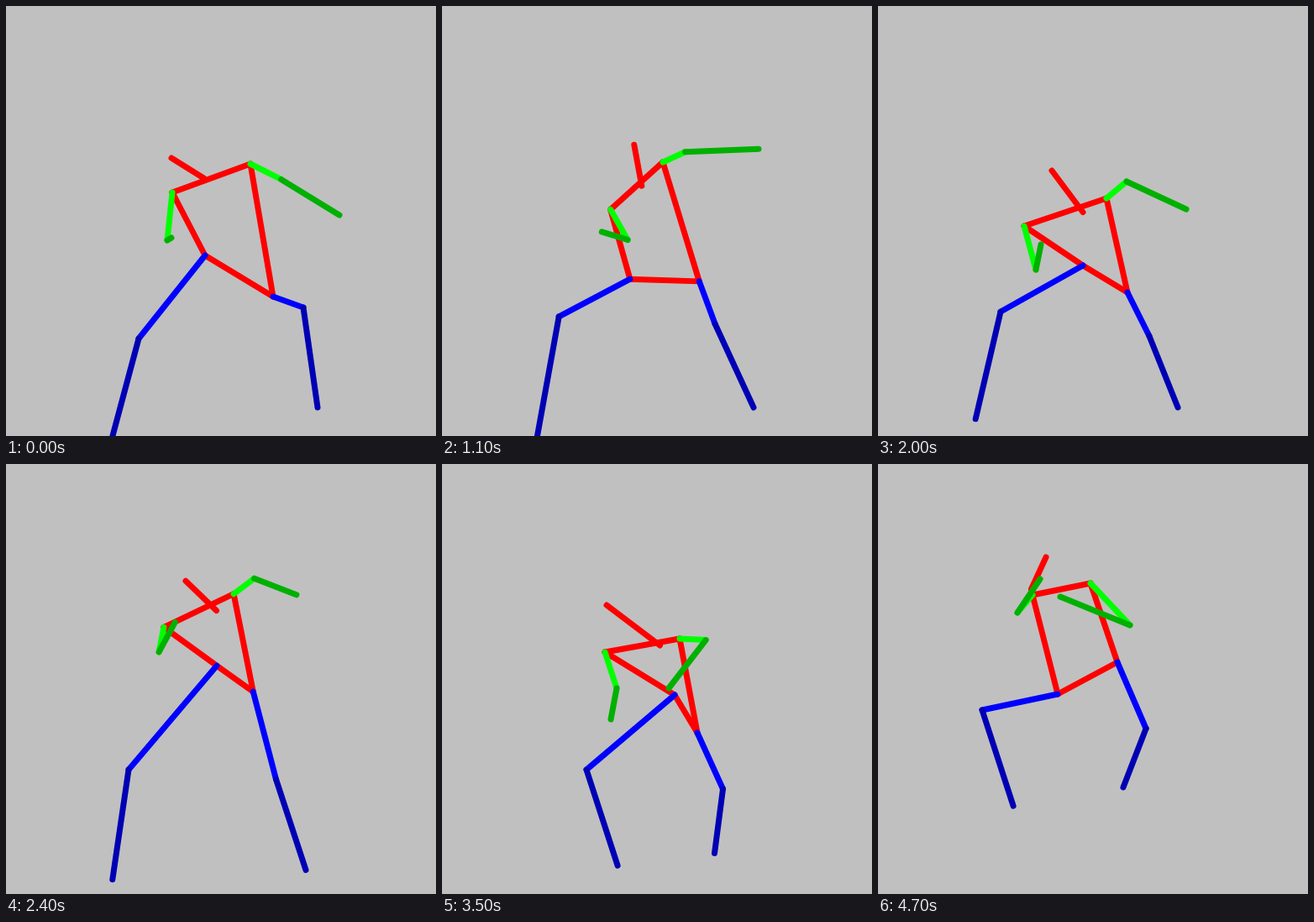
Animation, 512 px wide and 512 px high, one loop 4800 ms. Source, as an HTML page with a canvas:

```html
<!DOCTYPE html>
<html lang="en">
<head>
<meta charset="utf-8">
<title>Stick figure</title>
<style>
html, body { margin: 0; width: 100%; height: 100%; overflow: hidden; background: #c0c0c0; }
canvas { display: block; width: 100vw; height: 100vh; }
</style>
</head>
<body>
<canvas id="stage" width="512" height="512"></canvas>
<script>
const ctx = document.getElementById('stage').getContext('2d');
const LOOP = 4.8, FPS = 10;
const times = [0, 0.7, 1.4, 2, 2.9, 3.5, 4.7];

// Key points of the upper body, one x, y pair per key time
const keys = {
  head: [197,181, 206,192, 240,151, 207,196, 225,168, 196,168, 200,111],
  shoulderL: [198,222, 204,269, 195,224, 174,262, 208,212, 194,224, 184,156],
  shoulderR: [291,188, 269,186, 262,191, 272,229, 270,168, 283,208, 253,142],
  hipL: [237,297, 227,338, 225,312, 244,309, 259,264, 277,275, 214,274],
  hipR: [318,346, 315,322, 300,335, 297,341, 293,294, 304,320, 285,236],
  elbowL: [192,279, 207,261, 225,295, 188,314, 185,221, 208,267, 166,177],
  handL: [197,276, 192,303, 190,247, 194,284, 209,186, 201,304, 193,137],
  handR: [397,249, 365,205, 386,160, 367,242, 315,156, 270,267, 217,158]
};

const RED = '#ff0000', GREEN = '#00ff00', DARK_GREEN = '#00b000';
const BLUE = '#0000ff', DARK_BLUE = '#0000b4';

function slope(track, axis, i) {
  const a = Math.max(i - 1, 0), b = Math.min(i + 1, times.length - 1);
  return (track[2 * b + axis] - track[2 * a + axis]) / (times[b] - times[a]);
}

// Cubic Hermite curve through the keys
function sample(track, axis, t) {
  let i = times.length - 2;
  while (i > 0 && t < times[i]) i--;
  const span = times[i + 1] - times[i];
  const u = (t - times[i]) / span, v = 1 - u;
  return track[2 * i + axis] * v * v * (1 + 2 * u)
    + track[2 * i + 2 + axis] * u * u * (3 - 2 * u)
    + span * u * v * (v * slope(track, axis, i) - u * slope(track, axis, i + 1));
}

// Rises from 0 to 1 and back around a moment
function bump(t, centre, half) {
  const u = (t - centre) / half;
  return Math.abs(u) < 1 ? (1 - u * u) ** 2 : 0;
}

// Goes smoothly from 0 to 1 between two moments
function ease(t, from, to) {
  const u = Math.min(Math.max((t - from) / (to - from), 0), 1);
  return u * u * (3 - 2 * u);
}

const shift = (p, x, y) => ({ x: p.x + x, y: p.y + y });

function pose(t) {
  const p = {};
  for (const name in keys) {
    p[name] = { x: sample(keys[name], 0, t), y: sample(keys[name], 1, t) };
  }
  const jump = bump(t, 3.95, 0.45), rise = bump(t, 2.5, 0.4), reach = bump(t, 0.3, 0.3);
  const start = bump(t, 0, 0.7), step = bump(t, 0.7, 0.7), land = ease(t, 3.5, 4.7);

  // The neck slides along the shoulder line
  p.neck = shift(p.shoulderL,
    (p.shoulderR.x - p.shoulderL.x) / 2 - 9 + 30 * ease(t, 0.5, 1.7) - 57 * land,
    (p.shoulderR.y - p.shoulderL.y) / 2);

  // The right elbow lifts, then drops again
  const drop = ((t - 2) / 2.7) ** 2;
  p.elbowR = shift(p.shoulderR, 24 + 23 * drop + 15 * reach + 25 * jump, 70 * drop - 20);
  p.handR.x += 43 * reach + 18 * bump(t, 1.7, 0.3) + 85 * jump;

  // Left leg: steady knee, swinging shin
  const stretch = bump(t, 1.4, 0.9);
  const angle = (105 - 6 * stretch - 33 * ease(t, 2, 3.5)) * Math.PI / 180;
  const shin = 120 + 36 * stretch;
  p.kneeL = {
    x: 146 + 12 * start - 15 * step + 26 * bump(t, 3.5, 0.6) - 22 * land,
    y: 364 + 32 * start + 13 * step - 71 * land
  };
  p.footL = shift(p.kneeL, shin * Math.cos(angle), shin * Math.sin(angle) + 14 * rise);

  // Right leg: thigh slowly straightens, foot stays planted until the jump
  p.kneeR = shift(p.hipR, 20 + 3 * t + 16 * start - 10 * step, 32 + 10 * t - 19 * start + 17 * step);
  p.footR = {
    x: 371 - 14 * ease(t, 1.4, 2) - 65 * ease(t, 2.9, 4.1),
    y: 478 + 12 * bump(t, 2.8, 0.7) - 93 * ease(t, 3.1, 4.7)
  };

  for (const name in p) {
    p[name].y -= 112 * jump + (/knee|foot/.test(name) ? 0 : 55 * rise);
  }
  return p;
}

function line(color, a, b) {
  ctx.strokeStyle = color;
  ctx.beginPath();
  ctx.moveTo(a.x, a.y);
  ctx.lineTo(b.x, b.y);
  ctx.stroke();
}

function draw(t) {
  const p = pose(t);
  ctx.fillStyle = '#c0c0c0';
  ctx.fillRect(0, 0, 512, 512);
  ctx.lineWidth = 7;
  ctx.lineCap = 'round';
  line(RED, p.shoulderL, p.shoulderR);
  line(RED, p.hipL, p.hipR);
  line(RED, p.head, p.neck);
  for (const side of ['L', 'R']) {
    const joint = name => p[name + side];
    line(RED, joint('shoulder'), joint('hip'));
  }
  for (const side of ['L', 'R']) {
    const joint = name => p[name + side];
    line(GREEN, joint('shoulder'), joint('elbow'));
    line(DARK_GREEN, joint('elbow'), joint('hand'));
    line(BLUE, joint('hip'), joint('knee'));
    line(DARK_BLUE, joint('knee'), joint('foot'));
  }
}

const begin = performance.now();
function tick() {
  const t = (performance.now() - begin) / 1000 % LOOP;
  draw(Math.floor(t * FPS) / FPS);
  requestAnimationFrame(tick);
}
tick();
</script>
</body>
</html>
```
